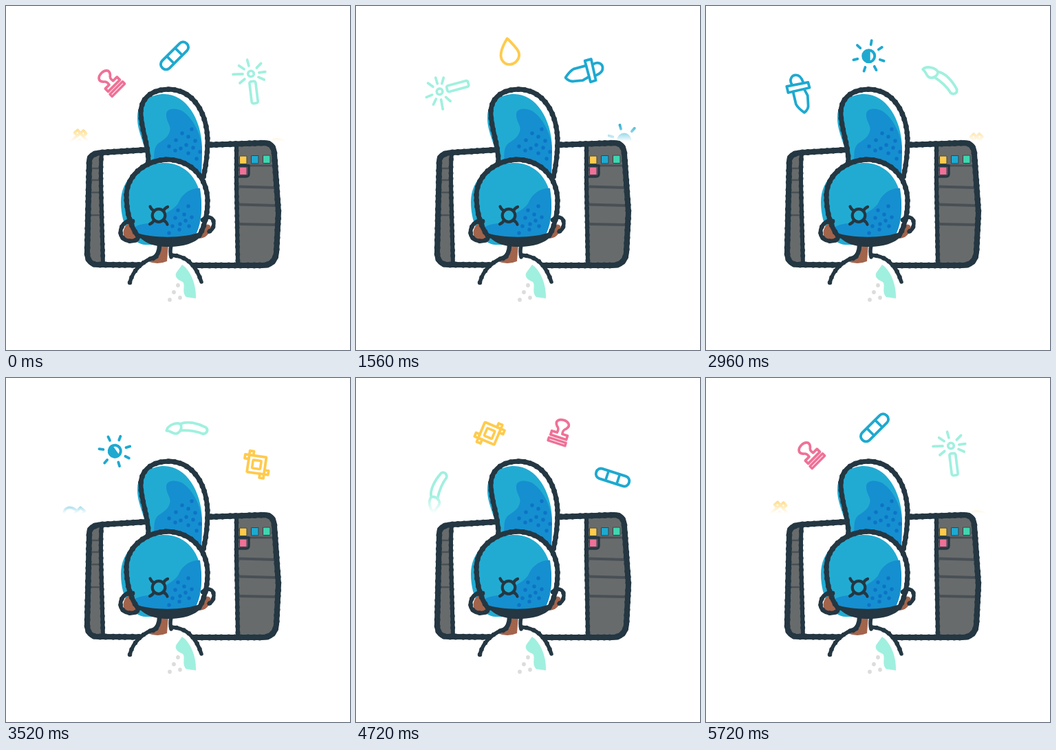
An HTML page with a canvas that plays this animation: 500x500 px, repeating every 5.76 s.

```html
<!DOCTYPE html>
<html lang="en">
<head>
<meta charset="utf-8">
<title>Tool wheel</title>
<style>
  html, body { margin: 0; width: 100%; height: 100%; overflow: hidden; background: #fff; }
  canvas { display: block; width: 100vmin; height: 100vmin; }
</style>
</head>
<body>
<canvas id="stage" width="500" height="500"></canvas>
<script>
const ctx = document.getElementById('stage').getContext('2d');
const LOOP = 5760, STEP = 40;
const HUB = { x: 250, y: 213 };
const INK = '#243742', GREY = '#686b6c', SEAM = '#485056', SKIN = '#a3644c';
const BLUE = '#22abd2', DEEP = '#158fd0', DOT = '#0d73c5';
const MINT = '#a0f0df', PINK = '#ef7197', YELLOW = '#ffcb4d', CYAN = '#1ea9d0';
const rad = d => d * Math.PI / 180;

ctx.lineCap = ctx.lineJoin = 'round';

function fill(d, color) {
  ctx.fillStyle = color;
  ctx.fill(new Path2D(d));
}

function line(d, color, width) {
  ctx.strokeStyle = color;
  ctx.lineWidth = width;
  ctx.stroke(new Path2D(d));
}

// Ink line with a slightly knobbly edge
function rough(d, width) {
  line(d, INK, width);
  ctx.setLineDash([0, 8, 0, 11, 0, 9]);
  line(d, INK, width + 1);
  ctx.setLineDash([]);
}

function dots(points, r, color) {
  ctx.fillStyle = color;
  for (const [x, y] of points) {
    ctx.beginPath();
    ctx.arc(x, y, r, 0, 7);
    ctx.fill();
  }
}

function box(x, y, w, h, r, color, width) {
  ctx.strokeStyle = color;
  ctx.lineWidth = width;
  ctx.beginPath();
  ctx.roundRect(x, y, w, h, r);
  ctx.stroke();
}

function rays(angles, from, to, color, width) {
  ctx.strokeStyle = color;
  ctx.lineWidth = width;
  ctx.beginPath();
  for (const a of angles) {
    const c = Math.cos(rad(a)), s = Math.sin(rad(a));
    ctx.moveTo(c * from, s * from);
    ctx.lineTo(c * to, s * to);
  }
  ctx.stroke();
}

function ring(r, color, width) {
  ctx.strokeStyle = color;
  ctx.lineWidth = width;
  ctx.beginPath();
  ctx.arc(0, 0, r, 0, 7);
  ctx.stroke();
}

function at(x, y, turn, draw) {
  ctx.save();
  ctx.translate(x, y);
  ctx.rotate(rad(turn));
  draw();
  ctx.restore();
}

// Each tool is drawn in stage coordinates for the wheel angle given by "ref"
const tools = [
  { ref: 0, draw() {
    at(245, 72.3, -45, () => {
      box(-25, -7.5, 50, 15, 7, CYAN, 3.9);
      line('M-8.5-7V7M8.5-7V7', CYAN, 3.7);
    });
  } },
  { ref: 0, draw() {
    at(356, 98.5, 0, () => {
      ring(4.3, MINT, 3.6);
      rays([-46, -8, 24, -105, -146, 140], 12, 21, MINT, 3.7);
      rays([178], 12, 26, MINT, 3.7);
    });
    at(360, 125.5, -7, () => box(-4.5, -16, 9, 32, 2.5, MINT, 3.7));
  } },
  { ref: 57.9, draw() {
    line('M334 67C322 71 308 77 308 88C308 96 314 101 321 101C330 101 335 95 335 87C335 80 335 73 334 67Z', YELLOW, 3.9);
  } },
  { ref: 141, draw() {
    line('M225 51L251 69L247 76L220 59Z', CYAN, 3.8);
    line('M232 55C234 46 242 45 246 49C250 53 249 58 246 64', CYAN, 3.8);
    line('M226 63L216 79C214 86 215 91 216 96C221 97 226 95 228 92L237 82L240 72', CYAN, 3.8);
  } },
  { ref: 186.3, draw() {
    at(236.7, 72.8, 0, () => {
      ring(8.5, CYAN, 4);
      fill('M2-9C-13-9-13 9 2 9Z', CYAN);
      rays([-137, -80, -34, 18, 62, 108, 166], 17, 23, CYAN, 3.8);
    });
  } },
  { ref: 185.4, draw() {
    line('M317 93C322 88 335 90 339 97C338 105 328 108 324 103C321 100 322 97 317 93Z', MINT, 3.8);
    line('M339 97C350 99 360 111 366 123C367 129 361 131 357 128C351 118 343 111 334 105', MINT, 3.8);
  } },
  { ref: 256.8, draw() {
    at(293, 75.8, -27, () => {
      box(-12.5, -12.5, 25, 25, 1, YELLOW, 3.8);
      box(-6, -6, 12, 12, 1, YELLOW, 3.6);
      for (const turn of [0, 180]) at(0, 0, turn, () =>
        line('M-12.5-12.5V-18.5H-6.5V-12.5M-12.5-12.5H-18.5V-6.5H-12.5', YELLOW, 3.7));
    });
  } },
  { ref: 0, draw() {
    at(150.7, 109.5, -45, () => {
      line('M-12 9V3H-4C-3-2-4-4-7-6C-13-13-6-17 0-17C6-17 13-13 7-6C4-4 3-2 4 3H12V9Z', PINK, 3.7);
      line('M-13 13.5H13V18H-13Z', PINK, 3.5);
    });
  } }
];

function wheel(angle) {
  for (const tool of tools) {
    ctx.save();
    ctx.translate(HUB.x, HUB.y);
    ctx.rotate(rad(tool.ref - angle));
    ctx.translate(-HUB.x, -HUB.y);
    tool.draw();
    ctx.restore();
  }
  const fog = ctx.createLinearGradient(0, 170, 0, 197);
  fog.addColorStop(0, 'rgba(255,255,255,0)');
  fog.addColorStop(1, '#fff');
  ctx.fillStyle = fog;
  ctx.fillRect(0, 170, 500, 330);
}

function tablet() {
  fill('M140 213Q121 214 121 226L118 358Q118 377 141 376Z', GREY);
  fill('M335 201L375 199Q389 199 390 215L396 300L393 358Q391 377 372 377H337Z', GREY);
  line('M123 236H137M123 253H137M122 271H137M121 304H137', SEAM, 2.6);
  line('M338 262.5L390 264M339 288.5L391 290M340 317L392 318', SEAM, 4);
  line('M339 232H387', SEAM, 3);
  line('M339 232H353V244Q353 248 349 248H339', INK, 3.4);
  const swatches = [[340, 218.5, YELLOW], [357, 218, CYAN], [374, 217.5, '#3fd6b0'], [340, 234.5, PINK]];
  for (const [x, y, color] of swatches) {
    box(x, y, 9.5, 10.5, 0, INK, 1.6);
    ctx.fillStyle = color;
    ctx.fillRect(x, y, 9.5, 10.5);
  }
  rough('M139 215Q137 230 139 300L141 375', 6);
  rough('M335 202L335 260L337 375', 6);
  rough('M204 209L140 213Q121 214 121 226L118 358Q118 377 136 376L276 377H372Q391 377 393 358L396 300L390 215Q389 199 375 199L292 202', 8);
}

function quiff() {
  const edge = 'M207 226C207 200 195 175 196 152C198 130 216 121 238 121C275 123 292 158 293 195C293 218 290 235 287 248';
  fill(edge, '#fff');
  fill('M206 232C204 200 190 185 191 160C192 138 212 128 230 128C262 128 284 165 285 205L284 247H206Z', BLUE);
  fill('M233 156C235 148 248 148 257 153C274 165 285 190 285 212L284 246H218C214 220 214 206 221 200C230 194 236 190 238 182C241 174 232 168 233 156Z', DEEP);
  dots([[270, 179], [256, 185], [265, 190], [275, 196], [247, 195], [262, 202], [237, 204], [272, 206],
    [254, 207], [282, 212], [246, 210], [265, 214], [277, 222]], 2.7, DOT);
  rough(edge, 6.8);
}

function head() {
  const edge = 'M192 335C179 318 175 295 175 274C177 243 205 224 235 223C272 225 293 252 293 284C293 304 288 321 281 334';
  fill(edge, '#fff');
  fill('M167 285C167 250 195 229 228 228C262 227 284 255 284 290C284 312 280 325 272 337L215 347H203C184 347 167 320 167 285Z', BLUE);
  fill('M282 265Q288 305 277 330L270 338H194L186 322C202 312 218 320 228 307C234 297 247 296 252 283C258 271 270 264 282 265Z', DEEP);
  dots([[265, 291], [250, 297], [246, 308], [259, 303], [270, 307], [261, 312], [242, 320], [253, 317],
    [266, 320], [252, 325], [237, 330]], 2.7, DOT);
  at(222, 304.5, 0, () => {
    ring(9.3, INK, 4.2);
    for (const turn of [0, 90, 180, 270]) at(0, 0, turn, () => line('M7-7Q9-11 13-12.5', INK, 4.2));
  });
  fill('M184 314C172 316 167 330 173 337C178 342 187 342 191 337Z', SKIN);
  rough('M184 313C170 311 165 324 167 333C171 342 183 344 191 339', 5.8);
  fill('M275 337C286 340 296 334 298 322C296 315 288 317 284 322Z', SKIN);
  rough('M286 311C291 304 302 306 302 316C302 322 299 326 295 328', 5.4);
  rough(edge, 6.8);
}

function body() {
  fill('M181 404C184 385 196 372 220 363H243C262 366 276 378 284 402V432H181Z', '#fff');
  fill('M222 346L219 366L206 371Q220 377 234 371L236 346Z', SKIN);
  line('M223 348Q223 361 214 367', INK, 6.5);
  line('M240 348Q238 357 240 365', INK, 5.5);
  fill('M188 329C212 338 260 338 284 328L280 338C268 348 250 350 236 350C215 350 200 345 188 329Z', INK);
  rough('M180 402C184 385 198 370 219 364', 5.5);
  rough('M240 362C262 363 276 376 284 401', 5.5);
  fill('M256 376C268 384 277 405 276 425L262 423C254 415 263 403 255 400C247 397 245 391 248 387Z', MINT);
  dots([[250, 406], [244, 416], [253, 424], [238, 427]], 2.9, '#dcdcdc');
}

function frame(now) {
  const tick = Math.floor((now % LOOP) / STEP);
  const ticks = LOOP / STEP - 1;
  ctx.fillStyle = '#fff';
  ctx.fillRect(0, 0, 500, 500);
  wheel(360 * tick / ticks);
  tablet();
  quiff();
  head();
  body();
}

const start = performance.now();
function loop() {
  frame(performance.now() - start);
  requestAnimationFrame(loop);
}
loop();
</script>
</body>
</html>
```
